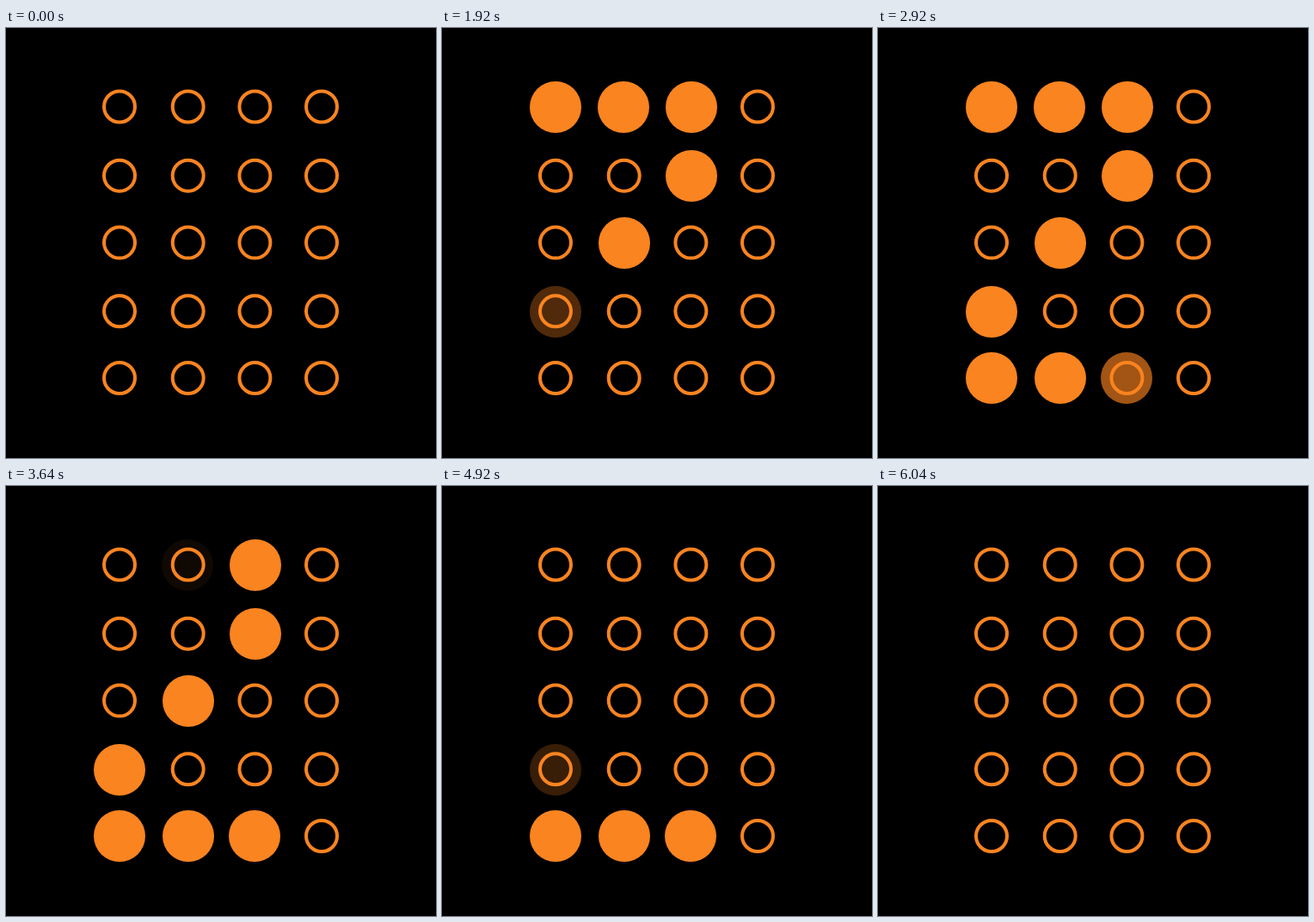
Recreate the animation shown at these times as an HTML page with a canvas. Size 500 px wide and 500 px high, loop 6.08 s.

```html
<!DOCTYPE html>
<html>
<head>
<meta charset="utf-8">
<style>
html, body { margin: 0; height: 100%; overflow: hidden; background: #000; }
canvas { display: block; width: 500px; height: 500px; }
</style>
</head>
<body>
<canvas id="stage" width="500" height="500"></canvas>
<script>
const ctx = document.getElementById('stage').getContext('2d');
const LOOP = 6080, ORANGE = '#fa8420';
const cols = [132, 211.7, 289.4, 367];
const rows = [91.5, 171.7, 249.6, 329.3, 407];

// Centres of the big dots, in the order they light up and go out
const dots = [
  [132, 92], [211, 92], [290, 92],
  [290, 172], [212, 250], [132, 330],
  [132, 407], [212, 407], [289, 407]
];
const fadeIn = { start: 320, step: 302.5, length: 280 };
const fadeOut = { start: 2995, step: 1000 / 3, length: 1000 / 3 };

const progress = (t, fade, i) =>
  Math.min(1, Math.max(0, (t - fade.start - i * fade.step) / fade.length));

function circle(x, y, r) {
  ctx.beginPath();
  ctx.arc(x, y, r, 0, 2 * Math.PI);
}

function draw(t) {
  ctx.globalAlpha = 1;
  ctx.fillStyle = '#000';
  ctx.fillRect(0, 0, 500, 500);
  ctx.fillStyle = ctx.strokeStyle = ORANGE;
  ctx.lineWidth = 4;
  for (const y of rows) for (const x of cols) {
    circle(x, y, 18);
    ctx.stroke();
  }
  dots.forEach(([x, y], i) => {
    ctx.globalAlpha = progress(t, fadeIn, i) - progress(t, fadeOut, i);
    circle(x, y, 30);
    ctx.fill();
  });
}

const origin = performance.now();
function tick() {
  draw((performance.now() - origin) % LOOP);
  requestAnimationFrame(tick);
}
tick();
</script>
</body>
</html>
```
